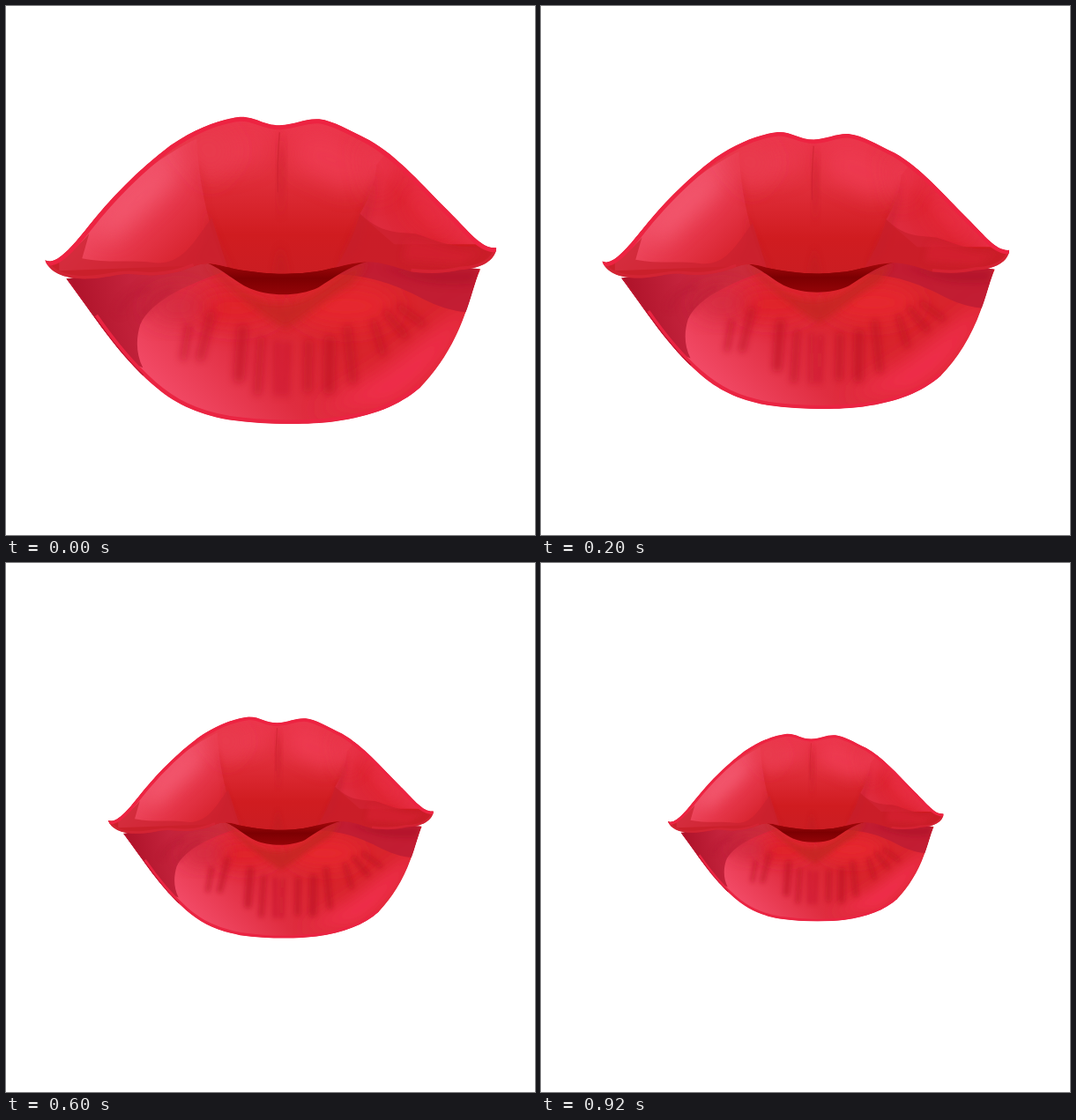
Animation, 600 px wide and 600 px high, one loop 1 s. Source, as an HTML page:

```html
<!DOCTYPE html>
<html lang="en">
<head>
<meta charset="utf-8">
<title>Kiss</title>
<style>
  html, body { margin: 0; width: 100%; height: 100%; overflow: hidden; background: #fff; }
  svg { display: block; width: 100%; height: 100%; }
  .soft { filter: url(#blur4); }
  .softer { filter: url(#blur12); }
</style>
</head>
<body>
<svg viewBox="0 0 600 600">
  <defs>
    <filter id="blur4" x="-50%" y="-50%" width="200%" height="200%"><feGaussianBlur stdDeviation="4"/></filter>
    <filter id="blur12" x="-60%" y="-60%" width="220%" height="220%"><feGaussianBlur stdDeviation="13"/></filter>

    <linearGradient id="middleFill" x1="0" y1="130" x2="0" y2="302" gradientUnits="userSpaceOnUse">
      <stop offset="0" stop-color="#ec364c"/><stop offset=".35" stop-color="#e12f3c"/>
      <stop offset=".75" stop-color="#d01c20"/><stop offset="1" stop-color="#cb1d22"/>
    </linearGradient>
    <linearGradient id="leftFill" x1="130" y1="200" x2="212" y2="285" gradientUnits="userSpaceOnUse">
      <stop offset="0" stop-color="#f25169"/><stop offset=".5" stop-color="#e6374a"/><stop offset="1" stop-color="#d6212b"/>
    </linearGradient>
    <linearGradient id="rightFill" x1="415" y1="240" x2="475" y2="190" gradientUnits="userSpaceOnUse">
      <stop offset="0" stop-color="#de2b3d"/><stop offset=".5" stop-color="#dd2330"/><stop offset="1" stop-color="#ea3048"/>
    </linearGradient>
    <linearGradient id="cornerFill" x1="80" y1="330" x2="220" y2="300" gradientUnits="userSpaceOnUse">
      <stop offset="0" stop-color="#b0142b"/><stop offset=".45" stop-color="#c4233c"/><stop offset="1" stop-color="#cb2c3b"/>
    </linearGradient>
    <linearGradient id="lowerFill" x1="180" y1="440" x2="325" y2="310" gradientUnits="userSpaceOnUse">
      <stop offset="0" stop-color="#f24a66"/><stop offset=".5" stop-color="#e02d40"/><stop offset="1" stop-color="#d8242c"/>
    </linearGradient>
    <linearGradient id="mouthFill" x1="0" y1="290" x2="0" y2="327" gradientUnits="userSpaceOnUse">
      <stop offset="0" stop-color="#a4080b"/><stop offset=".5" stop-color="#7c0002"/><stop offset="1" stop-color="#930407"/>
    </linearGradient>

    <path id="topEdge" d="M44 288C53 293 66 284 92 251C118 218 149 186 186 158C217 137 244 128 265 125.5C283 125 291 135 310 135C329 134 338 127 355 128C371 130 388 140 412 152C445 171 473 204 503 234C527 258 539 275 556 274"/>
    <path id="upper" d="M44 288C53 293 66 284 92 251C118 218 149 186 186 158C217 137 244 128 265 125.5C283 125 291 135 310 135C329 134 338 127 355 128C371 130 388 140 412 152C445 171 473 204 503 234C527 258 539 275 556 274C555 289 538 298 514 299C493 304 475 303 459 301C441 296 427 290 410 290C385 291 367 300 342 302C310 306 270 301 247 295C234 291 225 290 213 295C190 304 172 307 145 304C128 302 116 308 94 309C66 310 49 302 44 288Z"/>
    <path id="lower" d="M68 309L225 288L405 288L538 298C531 314 528 330 520 350C508 383 491 410 470 432C446 453 415 465 372 471C340 475 294 475 252 469C214 462 190 450 166 429C127 395 98 349 68 309Z"/>
    <clipPath id="upperClip"><use href="#upper"/></clipPath>
    <clipPath id="lowerClip"><use href="#lower"/></clipPath>
  </defs>

  <g id="lips">
    <g clip-path="url(#lowerClip)">
      <use href="#lower" fill="url(#lowerFill)"/>
      <ellipse class="softer" cx="260" cy="342" rx="52" ry="22" fill="#e0242c"/>
      <ellipse class="softer" cx="385" cy="340" rx="58" ry="25" fill="#e6252e"/>
      <path class="softer" d="M535 330C510 390 480 428 435 455L350 460L430 410Z" fill="#f02d4b"/>

      <!-- shaded corners -->
      <path d="M68 309L215 286L250 300C216 312 165 331 152 361C147 377 147 394 155 410L135 402Z" fill="url(#cornerFill)"/>
      <ellipse class="softer" cx="195" cy="340" rx="35" ry="18" fill="#d12b40" opacity=".8"/>
      <path class="soft" d="M128 350Q132 326 165 320M155 352Q162 333 190 320" fill="none" stroke="#b21630" stroke-width="9" opacity=".3"/>
      <path d="M376 304L410 286H540L522 347C498 345 480 336 461 326C437 315 414 306 376 304Z" fill="#c01c34" opacity=".9"/>
      <path class="soft" d="M425 295L460 300L535 299L530 314C482 319 457 309 425 295Z" fill="#a81025" opacity=".5"/>

      <!-- shade below the mouth -->
      <path class="soft" d="M225 291C250 300 265 335 308 337C355 337 370 300 410 290L392 315C365 330 345 350 316 366C290 350 262 330 225 291Z" fill="#c42522" opacity=".8"/>

      <g id="creases" class="soft" fill="none" stroke="#b90e20" stroke-linecap="round" opacity=".55"></g>
      <path d="M100 352C120 381 140 406 166 429C190 450 214 462 252 469C294 475 340 475 372 471C415 465 446 453 470 432" fill="none" stroke="#ea2442" stroke-width="9"/>
      <path d="M68 309C98 349 127 395 155 419" fill="none" stroke="#bd1730" stroke-width="3"/>
    </g>

    <path d="M222 289C255 287 282 296 315 298C350 298 374 289 412 289C388 295 370 309 354 319C331 330 297 329 276 320C256 311 247 298 222 289Z" fill="url(#mouthFill)"/>

    <g clip-path="url(#upperClip)">
      <use href="#upper" fill="url(#middleFill)"/>
      <path class="softer" d="M330 145C370 139 405 158 414 190L388 210L326 182Z" fill="#f03d55" opacity=".75"/>
      <path class="softer" d="M228 169C245 147 272 139 293 149L289 177L238 190Z" fill="#ee4156" opacity=".65"/>

      <!-- left cheek of the lip -->
      <path d="M60 290C92 252 135 190 216 150C218 205 232 255 246 293L60 300Z" fill="url(#leftFill)"/>
      <path class="softer" d="M102 258C120 222 156 190 200 165L182 208L123 262Z" fill="#f6637a" opacity=".65"/>
      <path class="softer" d="M190 150L240 135L262 165L232 200Z" fill="#e93a4e"/>
      <path class="soft" d="M217 178C220 218 236 266 256 299L212 288C236 268 226 222 217 178Z" fill="#c21c26" opacity=".5"/>

      <!-- centre line -->
      <path class="soft" d="M311 145Q321 185 311 241Q307 190 311 145Z" fill="#c81c2a" opacity=".5"/>
      <path d="M310 143Q307 178 308 211" fill="none" stroke="#cb2130" stroke-width="1.5" opacity=".6"/>
      <path class="soft" d="M311 271L319 304L304 304Z" fill="#bd1a22" opacity=".5"/>

      <!-- right cheek of the lip -->
      <path d="M420 180C418 206 407 226 401 236L440 270H540L480 200L432 165Z" fill="url(#rightFill)"/>
      <path class="softer" d="M458 200L510 252L485 258L455 230Z" fill="#ef3048" opacity=".5"/>
      <path class="softer" d="M400 155L440 165L434 205L414 215Z" fill="#ee3a52" opacity=".8"/>
      <path class="soft" d="M420 181C416 218 394 258 378 293L399 275C405 250 418 222 420 181Z" fill="#bd1a29" opacity=".6"/>
      <path d="M401 235C424 257 440 256 464 258C485 264 500 274 529 272L558 276L532 306H460L372 298C386 279 397 253 401 235Z" fill="#c91f2c" opacity=".7"/>
      <path class="soft" d="M455 265C486 266 505 281 540 278L515 293L450 288Z" fill="#da2236" opacity=".5"/>

      <!-- lower border -->
      <path d="M42 285C58 296 78 276 94 258L86 286C115 292 139 287 169 291C200 293 212 268 233 240L252 300L222 313H50Z" fill="#cb2230" opacity=".72"/>
      <path d="M44 288C49 302 66 310 94 309C116 308 128 302 145 304C172 307 190 304 213 295" fill="none" stroke="#dc293d" stroke-width="7" opacity=".5"/>
      <path d="M556 274C555 289 538 298 514 299C493 304 475 303 459 301" fill="none" stroke="#dc2639" stroke-width="7" opacity=".6"/>
      <use href="#topEdge" fill="none" stroke="#ed2341" stroke-width="10"/>
    </g>
  </g>
</svg>
<script>
  // Each crease: top x, top y, bottom x, bottom y, width
  const creases = [
    [207, 364, 201, 398, 7], [232, 350, 220, 398, 9], [268, 367, 264, 421, 12],
    [289, 378, 285, 437, 8], [307, 380, 307, 440, 5], [319, 382, 317, 440, 5],
    [343, 382, 342, 434, 9], [367, 380, 366, 434, 13], [387, 366, 393, 424, 9],
    [417, 358, 427, 393, 7], [431, 348, 452, 373, 8], [446, 341, 472, 360, 7]
  ];
  document.getElementById("creases").innerHTML = creases.map(([x1, y1, x2, y2, w]) =>
    `<path d="M${x1} ${y1}L${x2} ${y2}" stroke-width="${w}"/>`).join("");

  const lips = document.getElementById("lips");
  const scales = [1, 0.902, 0.807, 0.721, 0.611];
  const stepTime = 200;

  function draw(now) {
    const scale = scales[Math.floor(now / stepTime) % scales.length];
    lips.setAttribute("transform", `translate(300.3 300.3) scale(${scale}) translate(-300 -300)`);
    requestAnimationFrame(draw);
  }
  draw(performance.now());
</script>
</body>
</html>
```
